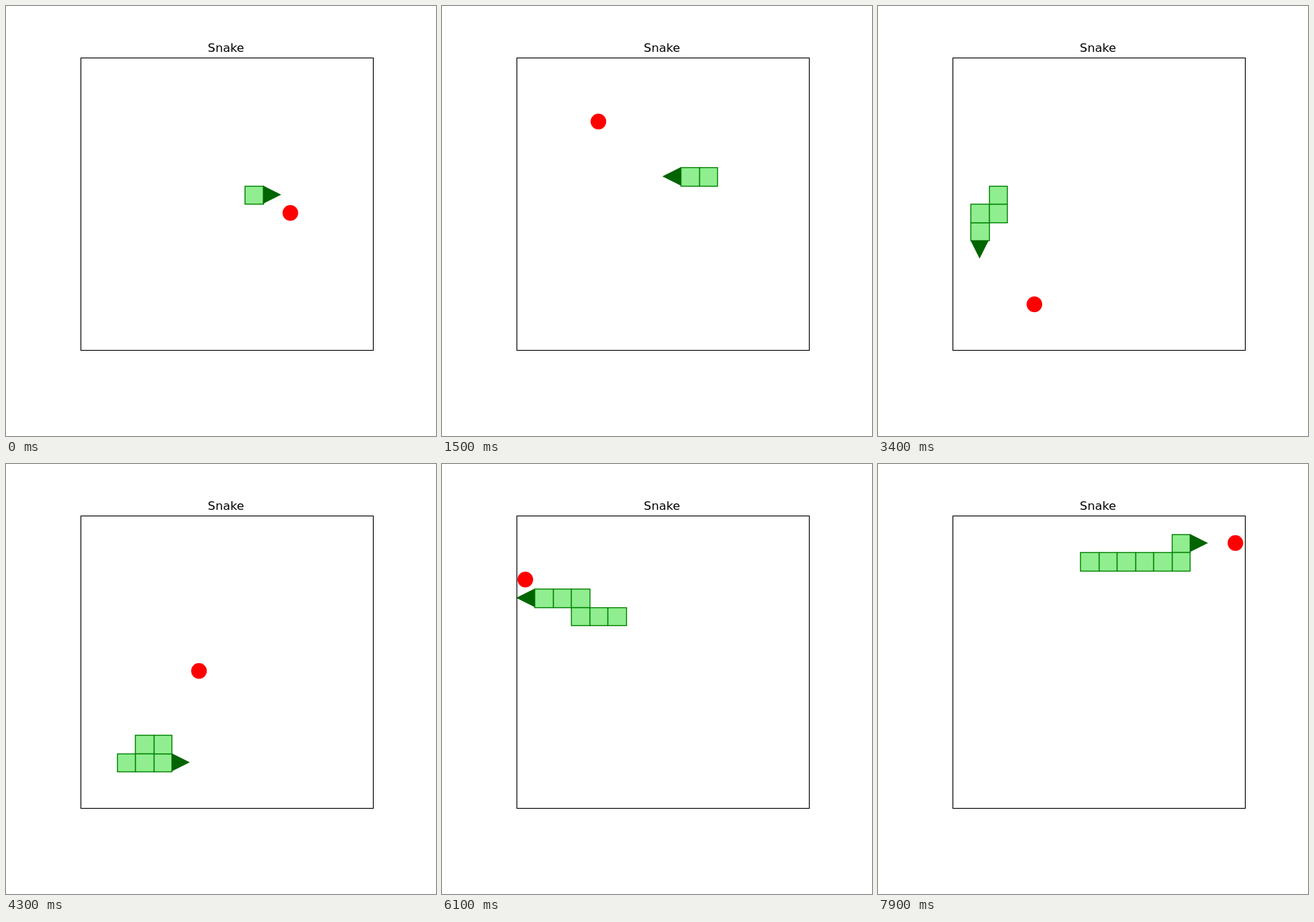
Animation, 600 px wide and 600 px high, one loop 8 s. Source, as an HTML page:

```html
<!DOCTYPE html>
<html lang="en">
<head>
<meta charset="utf-8">
<title>Snake</title>
<style>
  html, body { margin: 0; width: 100%; height: 100%; overflow: hidden; background: #fff; }
  svg { display: block; width: 600px; height: 600px; }
  text { font: 16.67px "DejaVu Sans", sans-serif; text-anchor: middle; }
  .body { fill: #90ee90; stroke: #008000; stroke-width: 1.39; }
  .head { fill: #006400; }
  .food { fill: #f00; }
</style>
</head>
<body>
<svg viewBox="0 0 600 600">
  <text x="306.9" y="64">Snake</text>
  <g id="game"></g>
  <rect x="104.5" y="72.5" width="408" height="408" fill="none" stroke="#000" stroke-width="1.11"/>
</svg>
<script>
const CELL = 25.5, LEFT = 103.5, TOP = 72, STEP = 100;
const DIRS = { R: [1, 0], L: [-1, 0], U: [0, -1], D: [0, 1] };
const ANGLE = { R: 0, D: 90, L: 180, U: 270 };
const MOVES = "RRRDDLLUR" + "UUULDLLULLURULLL" + "DLDDLDDLD" + "DDDRDRURD" +
  "RUUUURU" + "UURULLLLULLLU" + "URURRRRDRRRRRRRUR";
const FOODS = [[11, 8], [4, 3], [1, 9], [4, 13], [6, 8], [0, 3], [15, 1]];

const px = c => LEFT + c * CELL;
const py = r => TOP + r * CELL;
const snap = v => Math.round(v) + 0.5;

// Play the whole game once, keeping the state after each move.
const trail = [[9, 7]];
let eaten = 0;
const states = [...MOVES].map(dir => {
  const [x, y] = trail[0];
  const head = [x + DIRS[dir][0], y + DIRS[dir][1]];
  trail.unshift(head);
  if (String(head) === String(FOODS[eaten])) eaten++;
  return { dir, snake: trail.slice(0, 2 + eaten), food: FOODS[eaten] };
});

function bodyCell([c, r]) {
  const x = snap(px(c)), y = snap(py(r));
  return `<rect class="body" x="${x}" y="${y}" width="${snap(px(c + 1)) - x}" height="${snap(py(r + 1)) - y}"/>`;
}

function headCell([c, r], dir) {
  const h = CELL / 2;
  return `<path class="head" d="M${-h} ${-h}L${h} 0L${-h} ${h}Z"
    transform="translate(${px(c + 0.5)} ${py(r + 0.5)}) rotate(${ANGLE[dir]})"/>`;
}

function foodDot([c, r]) {
  return `<circle class="food" cx="${px(c + 0.5)}" cy="${py(r + 0.5)}" r="10.9"/>`;
}

const game = document.getElementById("game");
let shown = -1;

function draw() {
  const i = Math.floor(performance.now() / STEP) % states.length;
  if (i !== shown) {
    const { dir, snake: [head, ...body], food } = states[i];
    game.innerHTML = foodDot(food) + body.map(bodyCell).join("") + headCell(head, dir);
    shown = i;
  }
  requestAnimationFrame(draw);
}
draw();
</script>
</body>
</html>
```
